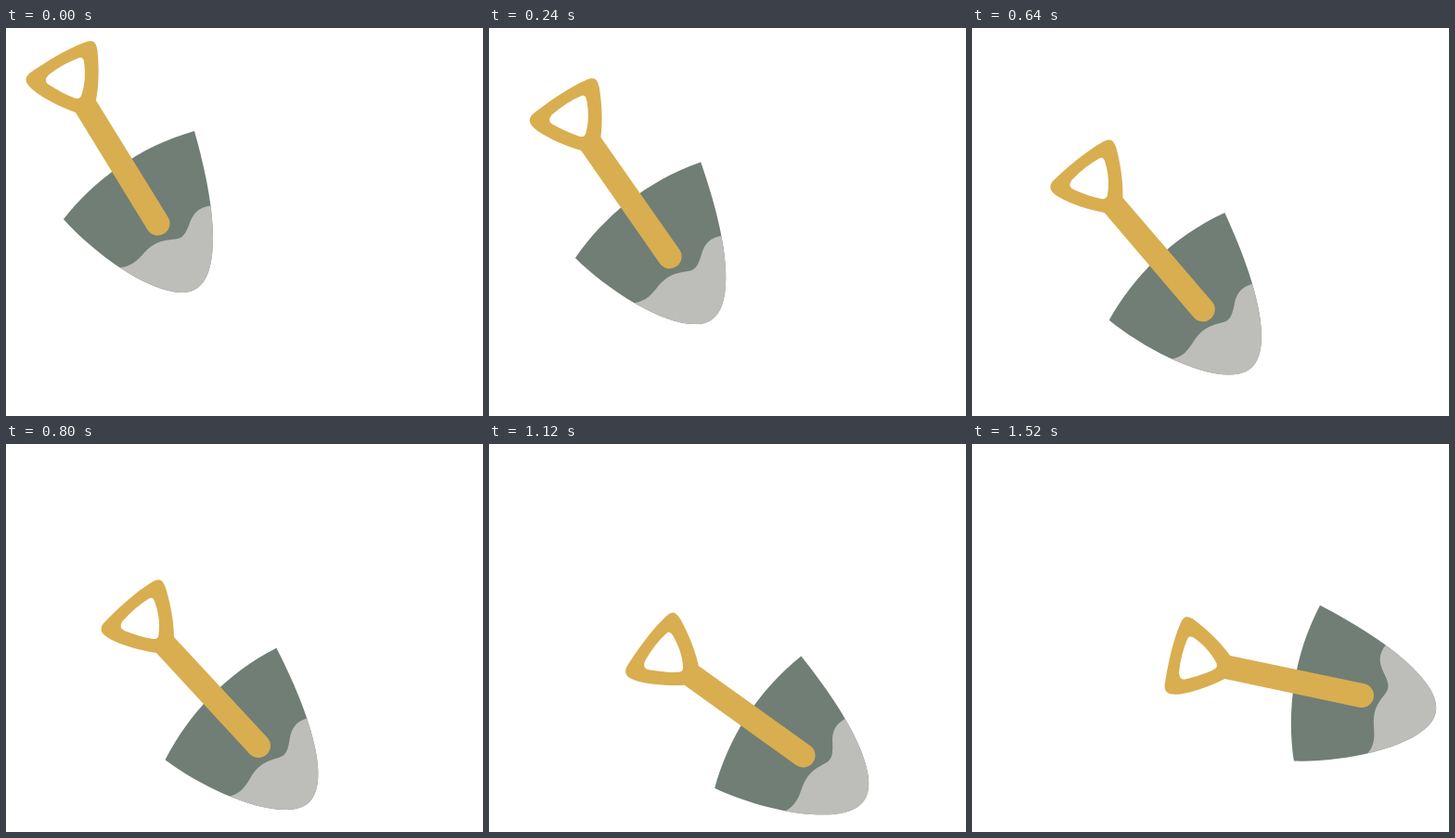
An HTML page with a canvas for the animation above (1.56 s loop, 514 by 418 pixels).

```html
<!DOCTYPE html>
<html lang="en">
<head>
<meta charset="utf-8">
<title>Shovel</title>
<style>
  html, body { margin: 0; width: 100%; height: 100%; overflow: hidden; background: #fff; }
  canvas { display: block; }
</style>
</head>
<body>
<canvas id="stage" width="514" height="418"></canvas>
<script>
const ctx = document.getElementById('stage').getContext('2d');
const LOOP = 1560, STEP = 40;
const GOLD = '#d8ae50', GREEN = '#707e75', GREY = '#bdbdb9';

// Centre of the round shaft end; the shovel is drawn in its starting pose.
const HUB = { x: 163.5, y: 210.5 };

const blade = new Path2D(`M62 206 C95 164 143 128 203 111
  C213 146 223 190 223 225 C223 256 217 285 190 285
  C154 285.5 95 243 62 206 Z`);

const edge = new Path2D(`M230 190.5 L221 191.5 C208 193 202 199 198 210
  C193.5 222 190.5 227 182 227.5 C165 229 159 232 149 242
  C141 251 135 257 123 258 L110 300 L240 300 Z`);

const shaft = new Path2D(`M75 91 L152.4 217.3 A13 13 0 0 0 174.6 203.7
  L97 78 L86 81 Z`);

const grip = new Path2D(`M75 91 C58 85 41 76 30 67.5 C21 60 19 55 25 49
  C40 38.5 64 23 86 15 C95 12 97 16 98.5 24 C100.5 44 100 62 97 78 L88 98 Z
  M46 50.5 C57 42 68 36 79 32 Q83 31 84 36 C86 50 85 62 81 73
  Q79 77.5 74 75.5 C64 72 56 67 46 61 Q39.5 57 46 50.5 Z`);

// Each pose: time, [x, y, degrees] and their rates per millisecond.
const poses = [
  { t: 0,    at: [163.5, 210.5, 0],     rate: [0.129, 0.150, -0.014] },
  { t: 800,  at: [272, 325, -11.2],     rate: [0.149, 0.133, -0.014] },
  { t: 1120, at: [338.5, 335.5, -22.8], rate: [0.234, -0.1155, -0.059] },
  { t: 1520, at: [420, 271, -46.5],     rate: [0.166, -0.201, -0.059] }
];

function hermite(a, b, va, vb, span, s) {
  const r = 1 - s;
  return a * r * r * (1 + 2 * s) + b * s * s * (3 - 2 * s)
    + span * s * r * (va * r - vb * s);
}

function poseAt(t) {
  let i = 0;
  while (i < poses.length - 2 && t > poses[i + 1].t) i++;
  const p = poses[i], q = poses[i + 1], span = q.t - p.t;
  return p.at.map((v, k) =>
    hermite(v, q.at[k], p.rate[k], q.rate[k], span, (t - p.t) / span));
}

function drawShovel() {
  ctx.fillStyle = GREEN;
  ctx.fill(blade);
  ctx.save();
  ctx.clip(blade);
  ctx.fillStyle = GREY;
  ctx.fill(edge);
  ctx.restore();

  ctx.fillStyle = GOLD;
  ctx.fill(shaft);
  ctx.fill(grip, 'evenodd');
}

function frame() {
  const t = Math.floor(performance.now() % LOOP / STEP) * STEP;
  const [x, y, degrees] = poseAt(t);
  ctx.fillStyle = '#fff';
  ctx.fillRect(0, 0, 514, 418);
  ctx.save();
  ctx.translate(x, y);
  ctx.rotate(degrees * Math.PI / 180);
  ctx.translate(-HUB.x, -HUB.y);
  drawShovel();
  ctx.restore();
  requestAnimationFrame(frame);
}
frame();
</script>
</body>
</html>
```
